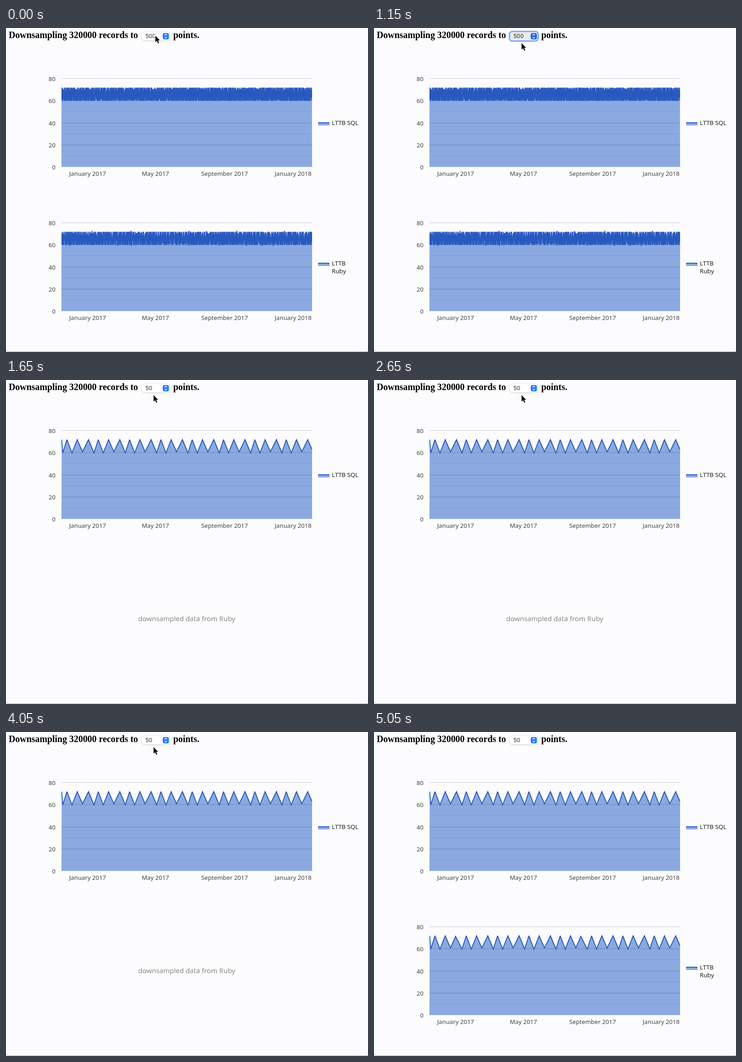
These frames come from a looping animation (790x708 px, 5.1 s). An HTML page with a canvas:

```html
<!DOCTYPE html>
<html>
<head>
<meta charset="utf-8">
<style>
  html, body { margin: 0; width: 100%; height: 100%; overflow: hidden; background: #fcfcfe; }
  canvas { display: block; }
</style>
</head>
<body>
<canvas id="stage" width="790" height="708"></canvas>
<script>
const ctx = document.getElementById('stage').getContext('2d');
const LOOP = 5100;
const T = { press: 250, menuOpen: 300, menuClose: 1000, reload: 1200, sql: 1600, fade: 4100, ruby: 4800 };
const LEFT = 121, RIGHT = 668, BASE = 304, UNIT = 193 / 80;
const LINE = '#2859c0', FILL = '#8ba9e0';
const LABEL = '13.2px "Noto Sans", sans-serif';
const LOADING = '15px "Noto Sans", sans-serif';
const TITLE = 'bold 19.9px "Liberation Serif", serif';
const CONTROL = '12px Inter, sans-serif';

const yOf = value => BASE - value * UNIT;

function randomFrom(seed) {
  return () => (seed = (seed * 16807) % 2147483647) / 2147483647;
}

// Zigzag of 50 points: three teeth that repeat along the axis.
function coarseSeries(shifted) {
  const points = [[121.5, 72], [124, 60]];
  for (let k = 0; k < 8; k++) {
    const x = 133 + 68.35 * k;
    const low = shifted && k % 4 === 0;
    points.push([x, 72], [x + 11, 60], [x + 22.4, 72], [x + 34, 61],
                [x + (low ? 45 : 47), low ? 71.5 : 72]);
    if (k < 7) points.push([x + 59, 60]);
  }
  points.push([RIGHT, 63]);
  return points;
}

function denseSeries(seed, jitter, outliers) {
  const rnd = randomFrom(seed), points = [];
  for (let i = 0; i < 500; i++) {
    const x = LEFT + (i + (rnd() - 0.5) * jitter) * (RIGHT - LEFT) / 499;
    const dip = rnd() < 0.25 ? rnd() * 1.5 : 0;
    let value = i % 2 ? 60 + dip : 72 - dip;
    if (outliers && rnd() < 0.025) value += i % 2 ? -0.8 : 0.9;
    points.push([Math.max(LEFT, Math.min(RIGHT, x)), value]);
  }
  points[499][1] = 63;
  return points;
}

const fine = { sql: denseSeries(71, 0.9, false), ruby: denseSeries(412, 1.5, true) };
const coarse = { sql: coarseSeries(false), ruby: coarseSeries(true) };

function text(str, x, y, font, color, align = 'left') {
  ctx.font = font;
  ctx.fillStyle = color;
  ctx.textAlign = align;
  ctx.fillText(str, x, y);
}

function roundBox(x, y, w, h, r, color) {
  ctx.beginPath();
  ctx.roundRect(x, y, w, h, r);
  ctx.fillStyle = color;
  ctx.fill();
}

function trace(points) {
  ctx.beginPath();
  for (const [x, value] of points) ctx.lineTo(x, yOf(value));
}

function drawChart(top, points, legend, legendY) {
  ctx.save();
  ctx.translate(0, top);
  trace(points);
  ctx.lineTo(RIGHT, BASE);
  ctx.lineTo(LEFT, BASE);
  ctx.fillStyle = FILL;
  ctx.fill();

  for (let value = 0; value <= 80; value += 10) {
    const major = value % 20 === 0, y = Math.round(yOf(value));
    ctx.fillStyle = value === 0 ? '#c6cad0' : `rgba(0,0,0,${major ? 0.2 : 0.08})`;
    ctx.fillRect(LEFT, y - 0.5 - 0.5, RIGHT - LEFT, 1);
    if (major) text(value, 108, y + 4.5, LABEL, '#444', 'right');
  }

  ctx.save();
  ctx.beginPath();
  ctx.rect(LEFT, 100, RIGHT - LEFT, 210);
  ctx.clip();
  trace(points);
  ctx.strokeStyle = LINE;
  ctx.lineWidth = 2;
  ctx.lineJoin = 'miter';
  ctx.miterLimit = 3;
  ctx.stroke();
  ctx.restore();

  [['January 2017', 178], ['May 2017', 326], ['September 2017', 477], ['January 2018', 626.5]]
    .forEach(([label, x]) => text(label, x, 323, LABEL, '#444', 'center'));

  ctx.fillStyle = FILL;
  ctx.fillRect(681, legendY, 25, 6);
  ctx.fillStyle = LINE;
  ctx.fillRect(681, legendY - 1, 25, 2);
  legend.forEach((row, i) => text(row, 711, legendY + 5 + i * 17, LABEL, '#222'));
  ctx.restore();
}

function drawSelect(value, focused) {
  if (focused) {
    roundBox(294, 6, 66, 24, 8, '#86abf5');
    roundBox(297, 9, 60, 18, 5, '#e9e9eb');
  } else {
    ctx.save();
    ctx.shadowColor = 'rgba(0,0,0,0.3)';
    ctx.shadowBlur = 2.5;
    ctx.shadowOffsetY = 0.5;
    roundBox(297, 9, 60, 18, 5, '#fff');
    ctx.restore();
  }
  text(value, 304.5, 22.3, CONTROL, '#222');
  roundBox(342, 11, 13.5, 14, 4, focused ? '#2466d8' : '#2a7bf5');
  ctx.beginPath();
  for (const dir of [-1, 1]) {
    ctx.moveTo(346, 18 + dir * 2);
    ctx.lineTo(348.7, 18 + dir * 4.5);
    ctx.lineTo(351.4, 18 + dir * 2);
  }
  ctx.strokeStyle = '#fff';
  ctx.lineWidth = 1.3;
  ctx.stroke();
}

function drawMenu(pointerY) {
  ctx.save();
  ctx.shadowColor = 'rgba(0,0,0,0.3)';
  ctx.shadowBlur = 8;
  ctx.shadowOffsetY = 2;
  roundBox(280, 1, 84, 54, 6, '#f0f0f2');
  ctx.restore();
  const active = pointerY < 28 ? 0 : 1;
  roundBox(285, 6 + active * 22, 74, 22, 4, '#3b82f6');
  ['500', '50'].forEach((option, i) =>
    text(option, 304.5, 21.5 + i * 22, CONTROL, i === active ? '#fff' : '#222'));
  ctx.beginPath();
  ctx.moveTo(290, 17);
  ctx.lineTo(293, 21);
  ctx.lineTo(298, 13);
  ctx.strokeStyle = active === 0 ? '#fff' : '#222';
  ctx.lineWidth = 1.5;
  ctx.stroke();
}

function drawPointer(x, y, alpha) {
  ctx.save();
  ctx.globalAlpha = alpha;
  ctx.translate(x, y);
  ctx.beginPath();
  [[0, 0], [0, 14], [3.2, 11], [5.6, 16.6], [8, 15.6], [5.6, 10.2], [9.8, 10]]
    .forEach(p => ctx.lineTo(...p));
  ctx.closePath();
  ctx.strokeStyle = '#fff';
  ctx.lineWidth = 2;
  ctx.stroke();
  ctx.fillStyle = '#000';
  ctx.fill();
  ctx.restore();
}

function drawWindowEdge() {
  ctx.beginPath();
  ctx.moveTo(0.5, 704);
  ctx.quadraticCurveTo(0.5, 707.5, 4, 707.5);
  ctx.lineTo(786, 707.5);
  ctx.quadraticCurveTo(789.5, 707.5, 789.5, 704);
  ctx.strokeStyle = '#a0a0a2';
  ctx.lineWidth = 1;
  ctx.stroke();
}

function render(t) {
  ctx.fillStyle = '#fcfcfe';
  ctx.fillRect(0, 0, 790, 708);

  const reloaded = t >= T.reload;
  const data = reloaded ? coarse : fine;
  text('Downsampling 320000 records to', 6, 22, TITLE, '#000');
  text('points.', 365, 22, TITLE, '#000');

  if (!reloaded || t >= T.sql) drawChart(0, data.sql, ['LTTB SQL'], 207);
  else text('downsampled data from SQL', 394.5, 212, LOADING, '#888', 'center');

  if (!reloaded || t >= T.ruby) drawChart(315, data.ruby, ['LTTB', 'Ruby'], 199);
  else text('downsampled data from Ruby', 394.5, 527, LOADING, '#888', 'center');

  const p = Math.max(0, Math.min(1, (t - 450) / 400));
  const ease = p * p * (3 - 2 * p);
  const pointer = { x: 326 - 4 * ease, y: 17 + 16 * ease };

  drawSelect(reloaded ? '50' : '500', t >= T.press && !reloaded);
  if (t >= T.menuOpen && t < T.menuClose) drawMenu(pointer.y);
  const alpha = Math.max(0, Math.min(1, 1 - (t - T.fade) / 100));
  if (alpha) drawPointer(pointer.x, pointer.y, alpha);
  drawWindowEdge();
}

const start = performance.now();
function tick() {
  render((performance.now() - start) % LOOP);
  requestAnimationFrame(tick);
}
tick();
</script>
</body>
</html>
```
